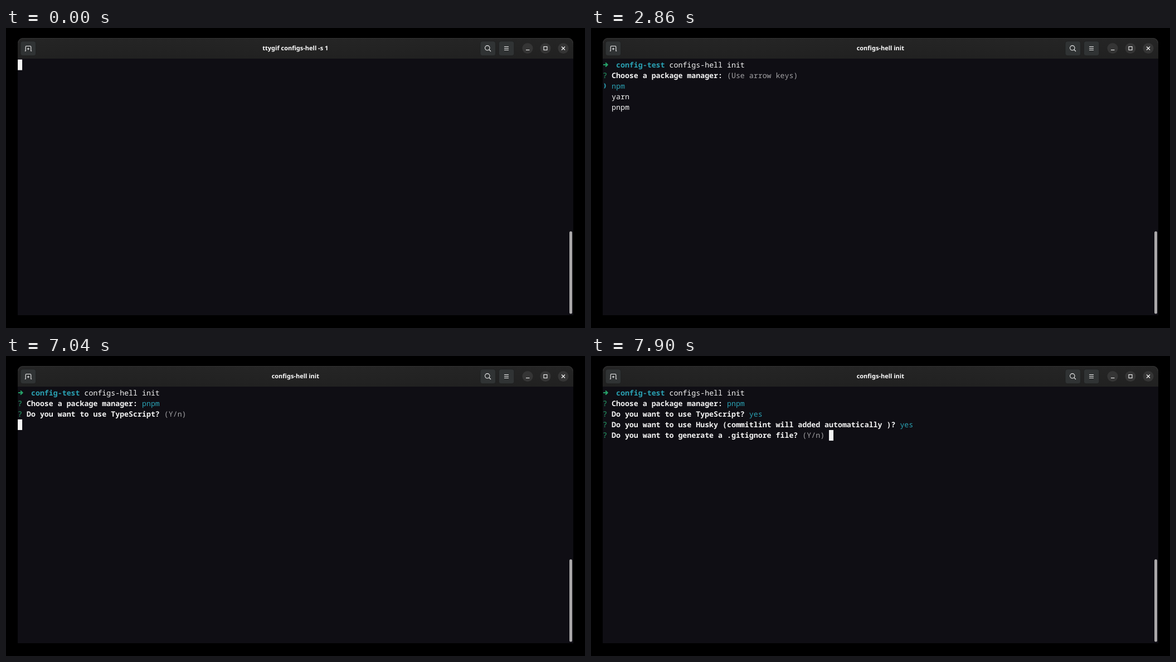
Recreate the animation shown at these times as an HTML page. Size 1039x539 px, loop 8000 ms.

```html
<!DOCTYPE html>
<html lang="en">
<head>
<meta charset="utf-8">
<title>Terminal session</title>
<style>
  html, body { margin: 0; width: 100%; height: 100%; overflow: hidden; background: #000; }
  svg { display: block; }
  text { white-space: pre; text-rendering: geometricPrecision; }
  #title { font: 600 11px "Noto Sans", "Open Sans", sans-serif; fill: #fff; text-anchor: middle; }
  #screen text { font: 500 13.27px "Noto Sans Mono", "DejaVu Sans Mono", monospace; fill: #f4f4f4; }
  #screen .bold { font-weight: 700; }
  #screen .cyan { fill: #2aa1b3; }
  #screen .green { fill: #26a269; }
  #screen .dim { fill: #a3a2a5; }
  #screen .ghost { fill: #5e5c64; }
  #screen .inverse { fill: #0f0e14; }
  .icon { fill: none; stroke: #f2f2f2; stroke-width: 1.1; }
</style>
</head>
<body>
<svg width="1039" height="539" viewBox="0 0 1039 539">
  <defs>
    <linearGradient id="bar" x2="0" y2="1">
      <stop stop-color="#252525"/><stop offset="1" stop-color="#212121"/>
    </linearGradient>
  </defs>
  <rect width="1039" height="539" fill="#000"/>
  <path d="M21 516V27a9 9 0 0 1 9-9H1009a9 9 0 0 1 9 9V516Z" fill="#0f0e14"/>
  <path d="M21 55V27a9 9 0 0 1 9-9H1009a9 9 0 0 1 9 9V55Z" fill="url(#bar)"/>
  <path d="M22 27a8.5 8.5 0 0 1 8-8.5H1009a8.5 8.5 0 0 1 8 8.5" fill="none" stroke="#383838" stroke-width=".8"/>
  <g fill="#303334" stroke="#1a1b1b" stroke-width=".6">
    <rect x="26" y="23.7" width="27.6" height="26" rx="4"/>
    <rect x="851" y="23.7" width="27.6" height="26" rx="4"/>
    <rect x="884.3" y="23.7" width="27.6" height="26" rx="4"/>
  </g>
  <g fill="#353535">
    <circle cx="936" cy="36.5" r="9.6"/><circle cx="968" cy="36.5" r="9.6"/><circle cx="1000" cy="36.5" r="9.6"/>
  </g>
  <g class="icon">
    <path d="M33.8 41.2H35.2V34a1.5 1.5 0 0 1 1.5-1.5H43.3a1.5 1.5 0 0 1 1.5 1.5V41.2H46.2M40 35.5V39.5M38 37.5H42"/>
    <circle cx="863.8" cy="35.8" r="4.2"/><path d="M866.9 38.9L870 42"/>
    <path d="M894 33.5H902M894 36.5H902M894 39.5H902"/>
    <path d="M933 39.5H939.5"/>
    <rect x="965" y="33.5" width="6" height="6"/>
    <path d="M997 33.5L1003 39.5M1003 33.5L997 39.5" stroke-width="1.3"/>
  </g>
  <text id="title" x="519.3" y="40.3"></text>
  <g id="screen"></g>
  <rect x="1011" y="365.3" width="5" height="148.3" rx="2.5" fill="#aaa8a9"/>
</svg>
<script>
const LOOP = 8000, CELL = 7.96, LINE = 19.1, LEFT = 21.1, TOP = 56.6;
const COMMAND = "configs-hell init";
const SHELL_TITLE = "morvek@morvekpez:~/Test/config-test";
const PROMPT_COLS = 15;

const title = document.getElementById("title");
const screen = document.getElementById("screen");
const px = col => LEFT + col * CELL;
const py = row => TOP + row * LINE;

// Each drawing helper takes a cell position and returns SVG markup.
const put = (col, row, str, style = "") =>
  `<text class="${style}" x="${px(col)}" y="${py(row) + 14.2}">${str}</text>`;
const cursor = (col, row, char = "") =>
  `<rect x="${px(col)}" y="${py(row)}" width="${CELL}" height="${LINE}" fill="#f4f4f4"/>` +
  put(col, row, char, "inverse");
const arrow = row =>
  `<path transform="translate(22 ${py(row) + 9.4})" d="M0 0H7M4 -3.6L7.6 0L4 3.6" fill="none" stroke="#26a269" stroke-width="2.1"/>`;
const pointer = row =>
  `<path transform="translate(23.4 ${py(row) + 9.2})" d="M0 -4.6H1.5Q4.8 0 1.5 4.6H0Q2.4 0 0 -4.6Z" fill="#2aa1b3"/>`;

const prompt = () => arrow(0) + put(3, 0, "config-test", "bold cyan");
const command = () => prompt() + put(PROMPT_COLS, 0, COMMAND);

function typing(count, suggest) {
  const end = PROMPT_COLS + count;
  const rest = suggest ? COMMAND.slice(count) : "";
  return prompt() + put(PROMPT_COLS, 0, COMMAND.slice(0, count)) +
    put(end + 1, 0, rest.slice(1), "ghost") + cursor(end, 0, rest[0]);
}

function question(row, str, reply = "", style = "cyan") {
  return put(0, row, "?", "green") + put(2, row, str, "bold") + put(str.length + 3, row, reply, style);
}

function confirm(row, str, withCursor = true) {
  return question(row, str, "(Y/n)", "dim") + (withCursor ? cursor(str.length + 9, row) : "");
}

const MANAGER = "Choose a package manager:";
const TYPES = "Do you want to use TypeScript?";
const HUSKY = "Do you want to use Husky (commitlint will added automatically )?";
const IGNORE = "Do you want to generate a .gitignore file?";

function menu(selected, hint = "") {
  const items = ["npm", "yarn", "pnpm"].map((name, i) =>
    put(2, i + 2, name, i === selected ? "cyan" : "") + (i === selected ? pointer(i + 2) : ""));
  return command() + question(1, MANAGER, hint, "dim") + items.join("");
}

const managerDone = () => command() + question(1, MANAGER, "pnpm");
const typesDone = () => managerDone() + question(2, TYPES, "yes");
const huskyDone = () => typesDone() + question(3, HUSKY, "yes");

const steps = [
  [0, () => cursor(0, 0)],
  [100, prompt],
  [120, () => typing(0, false)],
  [860, () => typing(1, false)],
  [880, () => typing(1, true)],
  [1130, () => typing(2, false)],
  [1150, () => typing(2, true)],
  [1310, () => typing(3, true)],
  [1390, () => typing(4, true)],
  [1670, command],
  [2860, () => menu(0, "(Use arrow keys)")],
  [4210, () => menu(1)],
  [4390, () => menu(2)],
  [6230, managerDone],
  [6330, () => managerDone() + confirm(2, TYPES)],
  [7040, () => managerDone() + confirm(2, TYPES, false) + cursor(0, 3)],
  [7140, () => typesDone() + cursor(0, 3)],
  [7240, () => typesDone() + confirm(3, HUSKY)],
  [7800, () => huskyDone() + cursor(0, 4)],
  [7900, () => huskyDone() + confirm(4, IGNORE)]
];

const titles = [[0, "ttygif configs-hell -s 1"], [100, SHELL_TITLE], [2750, COMMAND]];
const at = (list, t) => list.findLast(([start]) => start <= t)[1];

let shown;
function render(t) {
  title.textContent = at(titles, t);
  const draw = at(steps, t);
  if (draw !== shown) screen.innerHTML = draw();
  shown = draw;
}

const started = performance.now();
function tick() {
  render((performance.now() - started) % LOOP);
  requestAnimationFrame(tick);
}
tick();
</script>
</body>
</html>
```
